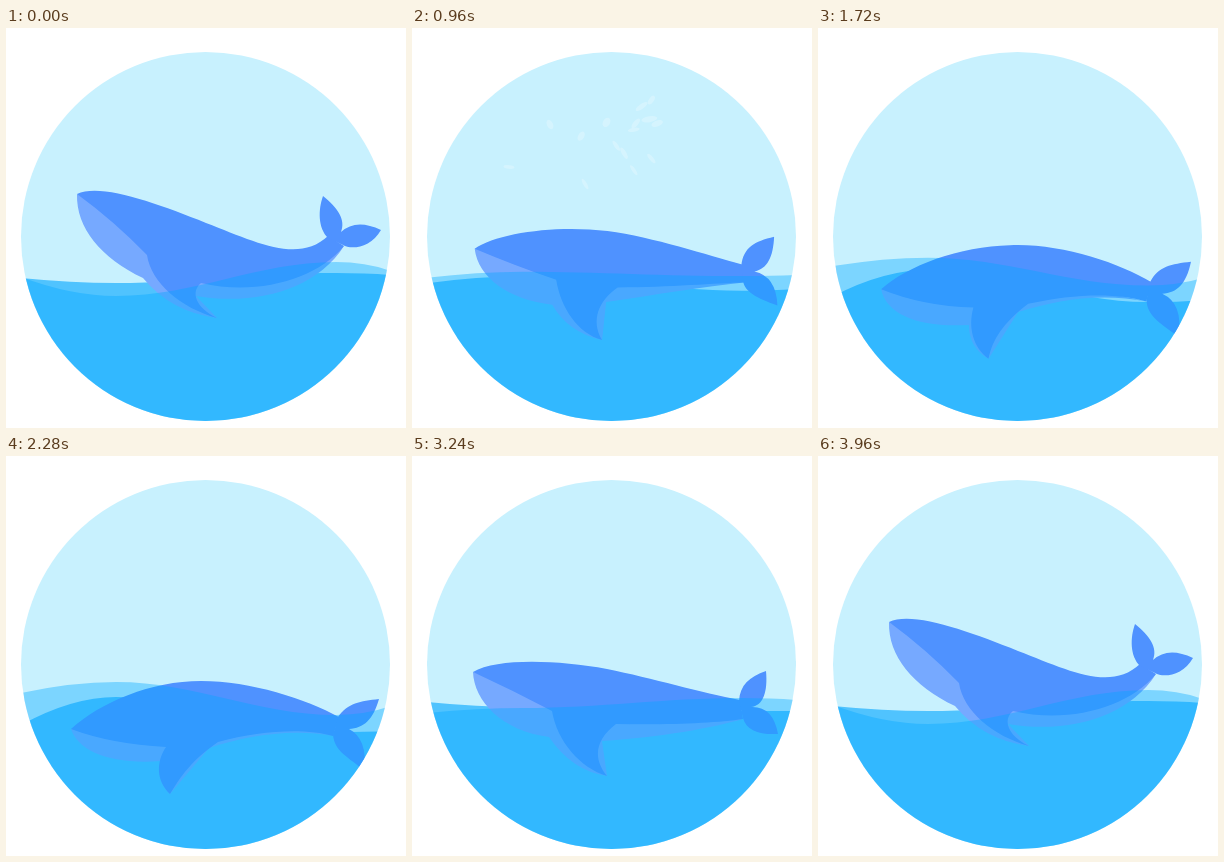
An HTML page that plays this animation: 400x400 px, repeating every 4 s.

```html
<!DOCTYPE html>
<html lang="en">
<head>
<meta charset="utf-8">
<title>Whale</title>
<style>
  html, body { margin: 0; width: 100%; height: 100%; overflow: hidden; background: #fff; }
  svg { display: block; width: 100%; height: 100%; }
</style>
</head>
<body>
<svg viewBox="0 0 400 400">
  <clipPath id="disc"><circle cx="199.5" cy="208.5" r="184.5"/></clipPath>
  <circle cx="199.5" cy="208.5" r="184.5" fill="#c8f1fe"/>
  <g clip-path="url(#disc)">
    <path id="backWave" fill="#00a6ff" fill-opacity=".6"/>
    <g id="spray" fill="#fff"></g>
    <path id="belly" fill="#76a9ff"/>
    <path id="body" fill="#4f92ff"/>
    <path id="tail" fill="#4f92ff"/>
    <path id="frontWave" fill="#00a6ff" fill-opacity=".38"/>
  </g>
</svg>
<script>
const LOOP = 4000, STEP = 40;
const times = [0, 640, 1320, 2280, 2920, 3240, 3960];
const $ = id => document.getElementById(id);

// Water outline from its left edge, left bulge, right bulge and right edge.
const wave = (l, a, b, r) =>
  `M15 ${l}Q66 ${a} 110 ${a}C190 ${a} 250 ${b} 330 ${b}Q360 ${b} 385 ${r}V400H15Z`;

// One outline per key time; the last key repeats the first.
const poses = {
  belly: [
    'M71 166C70 200 95 230 137 250Q165 284 211 290L190 268C250 278 310 262 338 218Q260 250 141 205Z',
    'M64 197C66 225 95 255 137 267Q160 297 200 303L192 272C250 268 300 258 334 242Q260 245 141 215Z',
    'M62 245C66 275 100 288 146 287Q152 312 179 322L197 277C240 266 285 260 330 266Q260 250 150 245Z',
    'M65 273C72 295 105 309 155 305Q150 325 164 338L203 292C240 280 285 272 327 280Q260 262 160 268Z',
    'M60 244C62 275 95 292 140 294Q156 325 188 335L194 291C245 280 290 275 331 282Q260 260 142 247Z',
    'M61 216C62 245 90 275 137 281Q160 315 195 320L190 285C250 281 300 272 331 263Q260 255 140 232Z'
  ],
  body: [
    'M71 166C95 155 150 175 200 195C250 214 292 236 322 208L338 218C310 252 250 268 195 255C184 264 190 280 211 290C175 280 145 255 141 227Q108 193 71 166Z',
    'M64 197C85 183 150 186 200 199C245 210 290 227 327 227L334 242C305 253 255 260 203 256C188 266 184 285 200 303C170 298 147 270 141 240Q105 215 64 197Z',
    'M62 245C85 226 140 209 190 209C240 209 300 228 334 246L330 266C305 259 260 259 208 266C185 284 174 302 179 322C160 312 150 290 150 266Q105 264 62 245Z',
    'M65 273C95 246 145 225 195 225C245 225 300 243 333 261L327 280C300 272 255 274 212 286C185 305 175 320 164 338C150 325 150 306 160 291Q105 288 65 273Z',
    'M60 244C85 224 130 218 177 218C230 218 295 238 334 258L331 282C305 270 260 270 208 274C182 290 175 312 188 335C162 325 143 298 142 270Q100 257 60 244Z',
    'M61 216C85 202 145 204 195 213C240 222 290 237 328 244L331 263C305 267 260 269 204 268C184 283 180 302 195 320C168 312 145 285 140 255Q100 234 61 216Z'
  ],
  tail: [
    'M322 210C312 200 312 182 317 168C332 180 340 192 335 204Q350 190 375 202C365 220 345 222 337 217Z',
    'M326 228C324 212 330 202 346 195C350 212 349 225 339 230Q359 229 368 250C350 252 336 249 332 240Z',
    'M332 246C338 228 352 225 373 222C369 245 360 255 345 256Q368 265 363 300C340 285 331 278 330 265Z',
    'M332 261C342 247 354 245 373 243C367 264 358 272 343 273Q362 283 358 314C337 298 329 294 327 279Z',
    'M332 259C336 241 353 236 374 232C370 255 361 268 346 269Q368 274 364 309C341 299 333 292 331 281Z',
    'M327 245C328 229 337 221 354 215C356 236 351 250 339 251Q361 250 366 278C347 279 334 274 331 262Z'
  ],
  backWave: [
    wave(250, 255, 245, 247), wave(246, 253, 254, 254), wave(267, 243, 271, 268),
    wave(269, 241, 276, 275), wave(263, 249, 263, 262), wave(246, 251, 255, 255)
  ],
  frontWave: [
    wave(249, 268, 234, 243), wave(257, 253, 241, 244), wave(240, 235, 255, 250),
    wave(237, 226, 259, 250), wave(243, 243, 249, 247), wave(257, 252, 242, 244)
  ]
};

// Monotone slope at each key: flat at turning points, harmonic mean elsewhere.
function slopes(v) {
  const d = v.slice(1).map((y, i) => (y - v[i]) / (times[i + 1] - times[i]));
  return v.map((_, i) => {
    const a = d[i - 1] || 0, b = d[i] || 0;
    return a * b > 0 ? 2 * a * b / (a + b) : 0;
  });
}

function curve(v) {
  const m = slopes(v);
  return t => {
    let i = 0;
    while (i < times.length - 2 && t >= times[i + 1]) i++;
    const h = times[i + 1] - times[i], u = Math.min(1, (t - times[i]) / h), w = 1 - u;
    return v[i] * (1 + 2 * u) * w * w + v[i + 1] * u * u * (3 - 2 * u)
         + h * u * w * (m[i] * w - m[i + 1] * u);
  };
}

function morph(id) {
  const number = /[\d.]+/g, shape = poses[id][0];
  const keys = [...poses[id], shape].map(p => p.match(number).map(Number));
  const curves = keys[0].map((_, i) => curve(keys.map(k => k[i])));
  const node = $(id);
  return t => {
    let i = 0;
    node.setAttribute('d', shape.replace(number, () => curves[i++](t).toFixed(2)));
  };
}
const morphs = Object.keys(poses).map(morph);

// Droplets: place late in the rise, tilt, half length, half width.
const drops = [
  [156, 102, 65, 5, 3], [185, 100, -60, 5, 3.5], [172, 113, -60, 5, 3],
  [208, 79, -55, 5, 2.5], [203, 85, -35, 7, 2.5], [207, 97, -10, 8, 3],
  [211, 101, -20, 6, 3], [199, 107, -10, 6, 2], [200, 101, -50, 6, 2.5],
  [135, 142, 5, 5.5, 1.8], [190, 122, 55, 6, 2], [194, 129, 60, 6.5, 2.3],
  [199, 145, 55, 6, 1.8], [208, 134, 50, 6, 2], [174, 158, 60, 6, 1.8]
].map(([x, y, tilt, rx, ry]) => {
  const node = document.createElementNS('http://www.w3.org/2000/svg', 'ellipse');
  node.setAttribute('rx', rx);
  node.setAttribute('ry', ry);
  node.setAttribute('opacity', .85);
  $('spray').append(node);
  return { x, y, tilt, node };
});

function spray(t) {
  const u = (t - 303) / 520, ox = 175, oy = 190;
  const alpha = u < 0 ? 0 : Math.max(0, Math.min(1, (1.45 - u) / .65));
  $('spray').setAttribute('opacity', alpha);
  const across = u / .648, up = (1 - (1 - u) ** 2) / .876;
  const size = Math.max(0, Math.min(1, u * 2));
  for (const { x, y, tilt, node } of drops) {
    const px = ox + (x - ox) * across, py = oy + (y - oy) * up;
    node.setAttribute('transform', `translate(${px} ${py}) rotate(${tilt}) scale(${size})`);
  }
}

function draw(now) {
  const t = Math.floor(now % LOOP / STEP) * STEP;
  morphs.forEach(f => f(t));
  spray(t);
}

let start;
function tick(now) {
  start ??= now;
  draw(now - start);
  requestAnimationFrame(tick);
}
draw(0);
requestAnimationFrame(tick);
</script>
</body>
</html>
```
